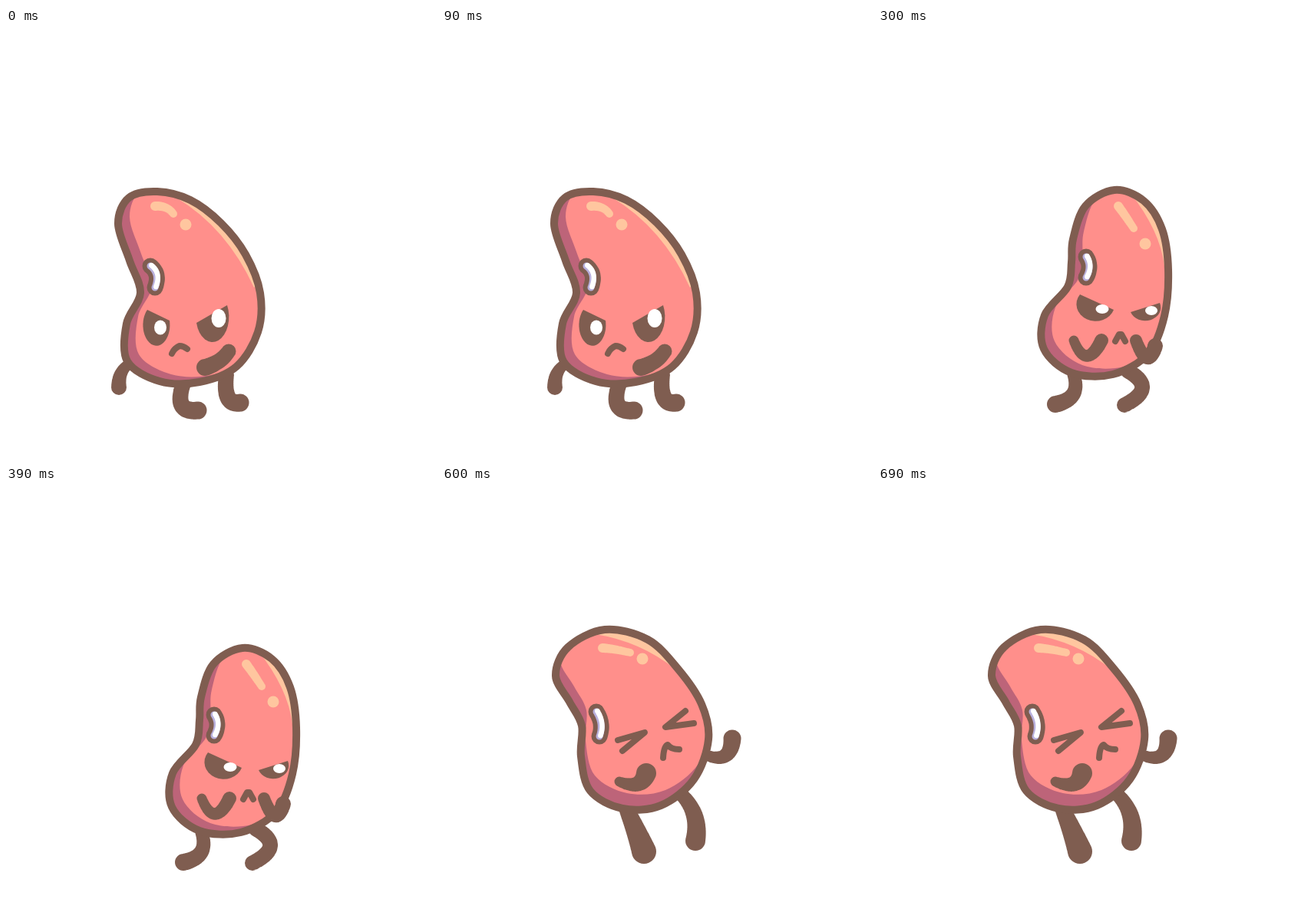
Recreate the animation shown at these times as an HTML page. Size 560 px wide and 560 px high, loop 750 ms.

```html
<!DOCTYPE html>
<html lang="en">
<head>
<meta charset="utf-8">
<title>Kidney bean dance</title>
<style>
html, body { margin: 0; width: 100%; height: 100%; overflow: hidden; background: #fff; }
svg { display: block; width: 100vw; height: 100vh; }
</style>
</head>
<body>
<svg id="stage" viewBox="0 0 560 560"></svg>
<script>
const INK = '#7f5d50', PINK = '#ff8f8b', SHADE = '#bd6479', GLOSS = '#ffc69f', LILAC = '#b9b0dc';
const HOLD = 150;

// body: key points of the outline; light: shift of the lit copy that leaves the shade
// gloss, spot, scar: start, middle, end
// limbs, arms: start, middle, end | first and last width
// eyes: lid ends | radii | pupil centre | pupil radii
const poses = [
  {
    body: '146,255 160,221 197,213 240,224 280,254 312,295 331,345 328,396 300,441 252,461 200,460 158,434 157,385 175,345 161,303',
    light: [15, -9],
    gloss: '222,221 280,270 323,338', spot: '194,232 208,234 218,242', dot: '234,256',
    scar: '188,310 196,322 194,338',
    limbs: ['157,440 149,452 147,468|14,20', '231,463 229,491 250,498|20,23', '287,452 289,481 305,488|20,23'],
    arms: ['259,442 277,434 290,421|22,19'],
    eyes: ['184,367 213,381|17.5,27|201,390|8,9.5', '248,384 288,361|21.5,33|277,378|9.5,12'],
    lines: ['M216 424Q219 417 226 414Q231 414 236 418']
  },
  {
    body: '207,250 215,208 243,194 285,194 319,216 344,254 358,305 355,360 335,412 297,439 250,438 210,411 204,372 223,326 219,288',
    light: [16, -7],
    gloss: '273,195 322,237 353,318', spot: '264,210 280,218 294,233', dot: '308,248',
    scar: '236,268 244,282 243,297',
    limbs: ['247,440 248,468 245,488|18,33', '312,440 318,465 326,482|17,35'],
    arms: ['209,421 223,410 237,395|16,24', '344,416 328,408 310,394|16,24'],
    eyes: ['242,323 260,348|18,23|247,345|6,8.5', '290,347 331,330|22.5,28|324,346|7.5,9'],
    lines: ['M261 395L273 385L284 395']
  },
  {
    body: '254,275 270,232 308,211 346,225 370,262 378,315 373,375 352,424 306,451 252,449 216,418 217,374 247,337 252,305',
    light: [14, -10],
    gloss: '328,214 359,263 373,310', spot: '313,232 323,246 333,261', dot: '348,281',
    scar: '271,298 275,311 271,325',
    limbs: ['255,452 254,477 231,490|17,22', '326,447 344,469 321,491|20,20'],
    arms: ['255,407 272,427 291,407|13,18', '336,407 350,429 361,414|16,20'],
    eyes: ['263,347 307,367|25,22|292,366|8.5,6', '329,370 367,358|20,17|356,368|8,6'],
    lines: ['M309 408L314 399L317 399L322 408']
  },
  {
    body: '258,235 269,195 309,175 348,190 380,226 394,275 386,328 363,381 325,419 280,431 239,412 222,367 234,320 259,277',
    light: [18, -13],
    gloss: '322,178 366,235 390,305', spot: '309,200 324,208 334,222', dot: '347,236',
    scar: '281,276 279,293 270,306',
    limbs: ['270,426 267,463 243,486|18,19', '324,424 327,457 335,477|15,27'],
    arms: ['291,321 305,297 320,271|14,22', '392,318 408,288 423,266|13,19'],
    eyes: [],
    lines: ['M306 312L341 321L308 336', 'M390 310L367 321L387 330', 'M333 378Q342 358 355 373']
  },
  {
    body: '148,247 164,210 212,187 268,200 308,239 338,284 347,330 328,382 285,416 235,420 193,397 181,352 182,312 166,281',
    light: [6, -20],
    gloss: '200,193 255,209 303,238', spot: '209,211 226,213 245,217', dot: '261,225',
    scar: '201,294 207,310 205,326',
    limbs: ['240,420 253,450 263,476|20,32', '313,403 329,430 330,462|18,26', '345,351 369,351 378,329|14,23'],
    arms: ['231,385 254,388 266,374|13,26'],
    eyes: [],
    lines: ['M229 331L264 321L235 345', 'M317 293L291 314L328 309', 'M288 354Q289 338 294 337Q298 343 309 343']
  }
];

const parse = s => s.split(' ').map(p => p.split(',').map(Number));

// Closed Catmull-Rom spline as cubic Béziers
function spline(text) {
  const p = parse(text), n = p.length;
  const at = i => p[(i + n) % n];
  return 'M' + p[0] + p.map((b, i) => {
    const a = at(i - 1), c = at(i + 1), e = at(i + 2);
    const c1 = b.map((v, k) => v + (c[k] - a[k]) / 6);
    const c2 = c.map((v, k) => v - (e[k] - b[k]) / 6);
    return `C${c1} ${c2} ${c}`;
  }).join('') + 'Z';
}

// Control point of the quadratic that passes through the middle point
const control = ([a, m, b]) => m.map((v, k) => 2 * v - (a[k] + b[k]) / 2);

// Round-ended curve whose width runs from w0 to w1
function taper(text, w0, w1 = w0) {
  const pts = parse(text), [a, , b] = pts, c = control(pts), steps = 40;
  let d = '';
  for (let i = 0; i <= steps; i++) {
    const t = i / steps, u = 1 - t, r = (w0 * u + w1 * t) / 2;
    const [x, y] = a.map((v, k) => u * u * v + 2 * u * t * c[k] + t * t * b[k]);
    d += `M${x - r} ${y}a${r} ${r} 0 1 0 ${2 * r} 0a${r} ${r} 0 1 0 ${-2 * r} 0`;
  }
  return d;
}

// Everything on the outer side of a curve
function rim(text) {
  const pts = parse(text), [a, , b] = pts;
  const out = [(b[1] - a[1]) / 2, (a[0] - b[0]) / 2];
  const move = p => p.map((v, k) => v + out[k]);
  return `M${a}Q${control(pts)} ${b}L${move(b)} ${move(a)}Z`;
}

const fill = (d, color, extra = '') => `<path d="${d}" fill="${color}" ${extra}/>`;
const line = (d, width) =>
  `<path d="${d}" fill="none" stroke="${INK}" stroke-width="${width}" stroke-linecap="round" stroke-linejoin="round"/>`;
const oval = ([x, y], [rx, ry], color) => `<ellipse cx="${x}" cy="${y}" rx="${rx}" ry="${ry}" fill="${color}"/>`;

function limb(text) {
  const [path, widths] = text.split('|');
  return fill(taper(path, ...parse(widths)[0]), INK);
}

function eye(text) {
  const [[from, to], [radii], [centre], [pupil]] = text.split('|').map(parse);
  return fill(`M${from}A${radii} 0 1 0 ${to}Z`, INK) + oval(centre, pupil, '#fff');
}

function draw(p, i) {
  const body = spline(p.body);
  return `<g opacity="0"><clipPath id="body${i}"><path d="${body}"/></clipPath>
    ${p.limbs.map(limb).join('')}
    ${fill(body, SHADE)}
    <g clip-path="url(#body${i})">
      ${fill(body, PINK, `transform="translate(${p.light})"`)}
      ${fill(rim(p.gloss), GLOSS)}
    </g>
    ${fill(taper(p.spot, 12, 10), GLOSS)}${oval(parse(p.dot)[0], [7.5, 7.5], GLOSS)}
    ${line(body, 10)}
    ${fill(taper(p.scar, 21), INK)}${fill(taper(p.scar, 9), LILAC)}
    ${fill(taper(p.scar, 6.5), '#fff', 'transform="translate(1.3 -1)"')}
    ${p.eyes.map(eye).join('')}
    ${p.lines.map(d => line(d, 8)).join('')}
    ${p.arms.map(limb).join('')}</g>`;
}

const stage = document.getElementById('stage');
stage.innerHTML = poses.map(draw).join('');

const loop = HOLD * poses.length;
[...stage.children].forEach((g, i) => g.animate(
  [
    { opacity: 1, offset: 0, easing: 'step-end' },
    { opacity: 0, offset: 1 / poses.length },
    { opacity: 0, offset: 1 }
  ],
  { duration: loop, iterations: Infinity, delay: i * HOLD - loop }
));
</script>
</body>
</html>
```
